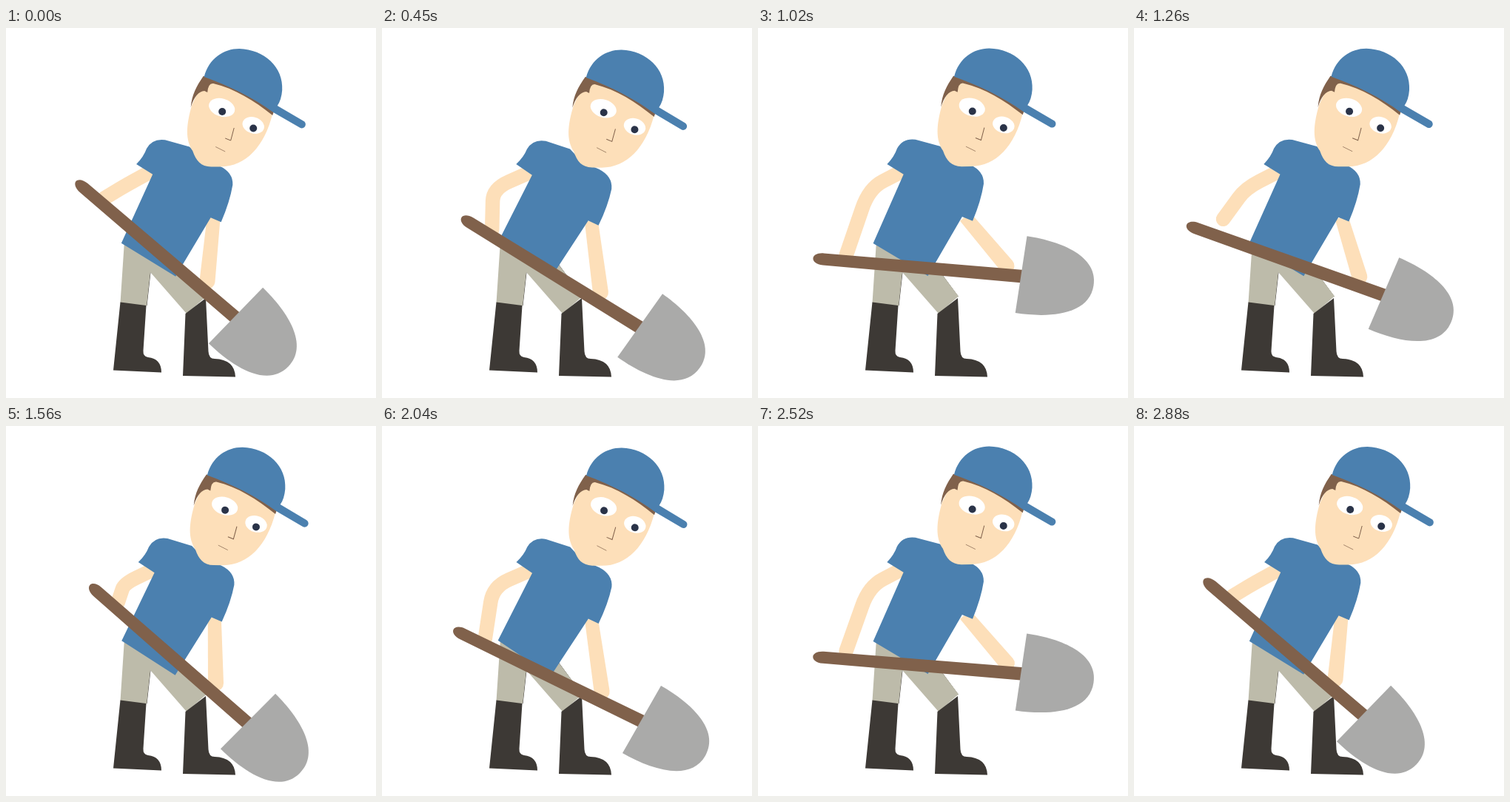
Recreate the animation shown at these times as an HTML page. Size 500 px wide and 500 px high, loop 3.15 s.

```html
<!DOCTYPE html>
<html lang="en">
<head>
<meta charset="utf-8">
<title>Digging</title>
<style>
  html, body { margin: 0; width: 100%; height: 100%; overflow: hidden; background: #fff; }
  svg { display: block; width: 100vw; height: 100vh; }
  .skin { fill: #fddfb9; }
  .shirt { fill: #4b80af; }
  .wood { fill: #80614b; }
  .pants { fill: #bdbbaa; }
  .boot { fill: #3d3935; }
  .metal { fill: #aaaaa9; }
  .line { fill: none; stroke: #80614b; }
</style>
</head>
<body>
<svg viewBox="0 0 500 500">
  <g id="legs">
    <path d="M195 330L190 375M238 319L270.500 363" fill="none" stroke="#3d3935"/>
    <path class="pants" d="M160 288L154.500 371.500L190 375.500L195 330L244 386L271 362.500L236 316Z"/>
    <path class="boot" d="M154.500 370.500L189.500 375L185.500 436Q185 444 192 445Q210 447 210 465.500L145 462.500Z"/>
    <path class="boot" d="M242.500 386L270 365L273.500 437Q274 447 282 447Q309 448 310 471.500L239 470Z"/>
  </g>

  <path id="backArm" fill="none" stroke="#fddfb9" stroke-width="19.500" stroke-linecap="round"/>
  <path id="frontArm" class="skin"/>

  <path id="torso" class="shirt" d="M249 161L216 151.500Q199 149 191 163Q187 174 177 184L199 198L156 290.500L229 336L277 257L291 263Q303 236 307 213Q308 196 289 187L266 178Z"/>

  <g id="head">
    <path class="skin" d="M268 70L252 104C244 132 243 151 253 166C258 180 264 187 278 187.500L291 187.500C325 187 350 160 361 116C335 92 300 72 268 70Z"/>
    <path class="wood" d="M267.500 65C258 79 252 90 250.500 107Q257 86 269 85L273 87Q274 74 281 75C310 82 336 98 361 118L363 112C330 86 300 70 267.500 65Z"/>
    <path class="shirt" d="M268.500 66C275 41 295 28 316 28C350 29 376 53 374 84Q373 97 367.500 105L402.500 125.500A5 5 0 0 1 398.500 135L362 114C335 94 302 78 268.500 66Z"/>
    <ellipse cx="292.500" cy="107.500" rx="18" ry="12" transform="rotate(17 292.500 107.500)" fill="#fff"/>
    <ellipse cx="335" cy="131.500" rx="15" ry="11" transform="rotate(17 335 131.500)" fill="#fff"/>
    <circle cx="293" cy="113" r="5" fill="#2a3348"/>
    <circle cx="335" cy="135.500" r="5" fill="#2a3348"/>
    <path class="line" d="M309 135L304.500 152L297 149"/>
    <path class="line" d="M284 160.500L297 167" stroke-width=".7"/>
  </g>

  <g id="shovel">
    <path class="wood" transform="translate(0 2.300)" d="M3 -8.800L-268 -8C-277 -8 -282 -4 -282 0C-282 4 -277 8 -268 8L3 8.800Z"/>
    <path class="metal" transform="rotate(3.700)" d="M0 -52.500C48 -52.500 99 -40 99 0C99 40 48 52.500 0 52.500Z"/>
  </g>
</svg>
<script>
  const LOOP = 3150, STEP = 30, SCOOP = 1470, REST = 2880;

  // Shovel and head sway at the turning points of one scoop
  const keys = [
    { at: 0,    x: 310.5, y: 388.5, angle: 40.5, sway: 0 },
    { at: 90,   x: 327,   y: 399,   angle: 41.2, sway: 3.5 },
    { at: 150,  x: 341,   y: 409,   angle: 41.5, sway: 4.5 },
    { at: 570,  x: 351,   y: 396.5, angle: 26,   sway: 7 },
    { at: 780,  x: 356,   y: 364.5, angle: 15.5, sway: 2.5 },
    { at: 1050, x: 355.5, y: 332.5, angle: 4.7,  sway: -2.3 },
    { at: 1230, x: 350,   y: 347,   angle: 12.5, sway: -1.5 },
    { at: 1260, x: 337.5, y: 358.5, angle: 19.6, sway: -1 }
  ];
  keys.push({ ...keys[0], at: 1440 });
  const last = keys.length - 1;

  const part = id => document.getElementById(id);
  const [torso, head, shovel, backArm, frontArm] =
    ["torso", "head", "shovel", "backArm", "frontArm"].map(part);

  const slope = (i, name) => (keys[i + 1][name] - keys[i][name]) / (keys[i + 1].at - keys[i].at);

  // Tangent that never overshoots a key
  function tangent(i, name) {
    const a = slope(i > 0 ? i - 1 : last - 1, name);
    const b = slope(i < last ? i : 0, name);
    return a * b > 0 ? 2 * a * b / (a + b) : 0;
  }

  function valueAt(time, name) {
    if (time >= keys[last].at) return keys[last][name];
    const i = keys.findIndex(k => k.at > time) - 1;
    const p = keys[i], q = keys[i + 1];
    const span = q.at - p.at, u = (time - p.at) / span, v = 1 - u;
    return p[name] * v * v * (1 + 2 * u) + q[name] * u * u * (3 - 2 * u) +
      span * u * v * (v * tangent(i, name) - u * tangent(i + 1, name));
  }

  function turn([x, y], deg, [ox, oy]) {
    const a = deg * Math.PI / 180, c = Math.cos(a), s = Math.sin(a);
    return [ox + x * c - y * s, oy + x * s + y * c];
  }

  const mix = (a, b, k) => [a[0] + (b[0] - a[0]) * k, a[1] + (b[1] - a[1]) * k];

  // The elbow folds inwards as the hand rises
  function bentArm(shoulder, hand) {
    const fold = Math.max(0, 260 - hand[1]) * .45;
    const elbow = [150 + fold, 217 - fold * .4];
    return `M${shoulder}L${mix(elbow, shoulder, .45)}Q${elbow} ${mix(elbow, hand, .3)}L${hand}`;
  }

  // Narrow at the sleeve, round at the hand
  function taperedArm(top, hand, r0, r1) {
    const dx = hand[0] - top[0], dy = hand[1] - top[1], len = Math.hypot(dx, dy);
    const side = (p, r) => [p[0] - dy / len * r, p[1] + dx / len * r];
    return `M${side(top, r0)}L${side(hand, r1)}A${r1} ${r1} 0 0 0 ${side(hand, -r1)}L${side(top, -r0)}Z`;
  }

  function draw(ms) {
    const t = Math.floor(ms % LOOP / STEP) * STEP;
    const phase = t < REST ? t % SCOOP : 0;
    const [x, y, angle, sway] = ["x", "y", "angle", "sway"].map(name => valueAt(phase, name));
    const lean = sway * .35 - .4;

    // Hands follow the shaft; the back one slips across it while lifting and returning
    const slip = phase > 600 && phase < 1440 ? Math.sin((phase - 600) / 840 * 2 * Math.PI) : 0;
    const backHand = turn([-238, 17 * slip - 5], angle, [x, y]);
    const frontHand = turn([-20 - (y - 332.5) * .7, -10], angle, [x, y]);
    const onBody = (px, py) => turn([px - 180, py - 310], lean, [180, 310]);

    shovel.setAttribute("transform", `translate(${x} ${y}) rotate(${angle})`);
    torso.setAttribute("transform", `rotate(${lean} 180 310)`);
    head.setAttribute("transform", `translate(${sway - .8} ${sway * .2}) rotate(${sway * .1} 300 180)`);
    backArm.setAttribute("d", bentArm(onBody(194, 195.5), backHand));
    frontArm.setAttribute("d", taperedArm(onBody(281, 257), frontHand, 9, 10.5));
  }

  const start = performance.now();
  function tick() {
    draw(performance.now() - start);
    requestAnimationFrame(tick);
  }
  tick();
</script>
</body>
</html>
```
